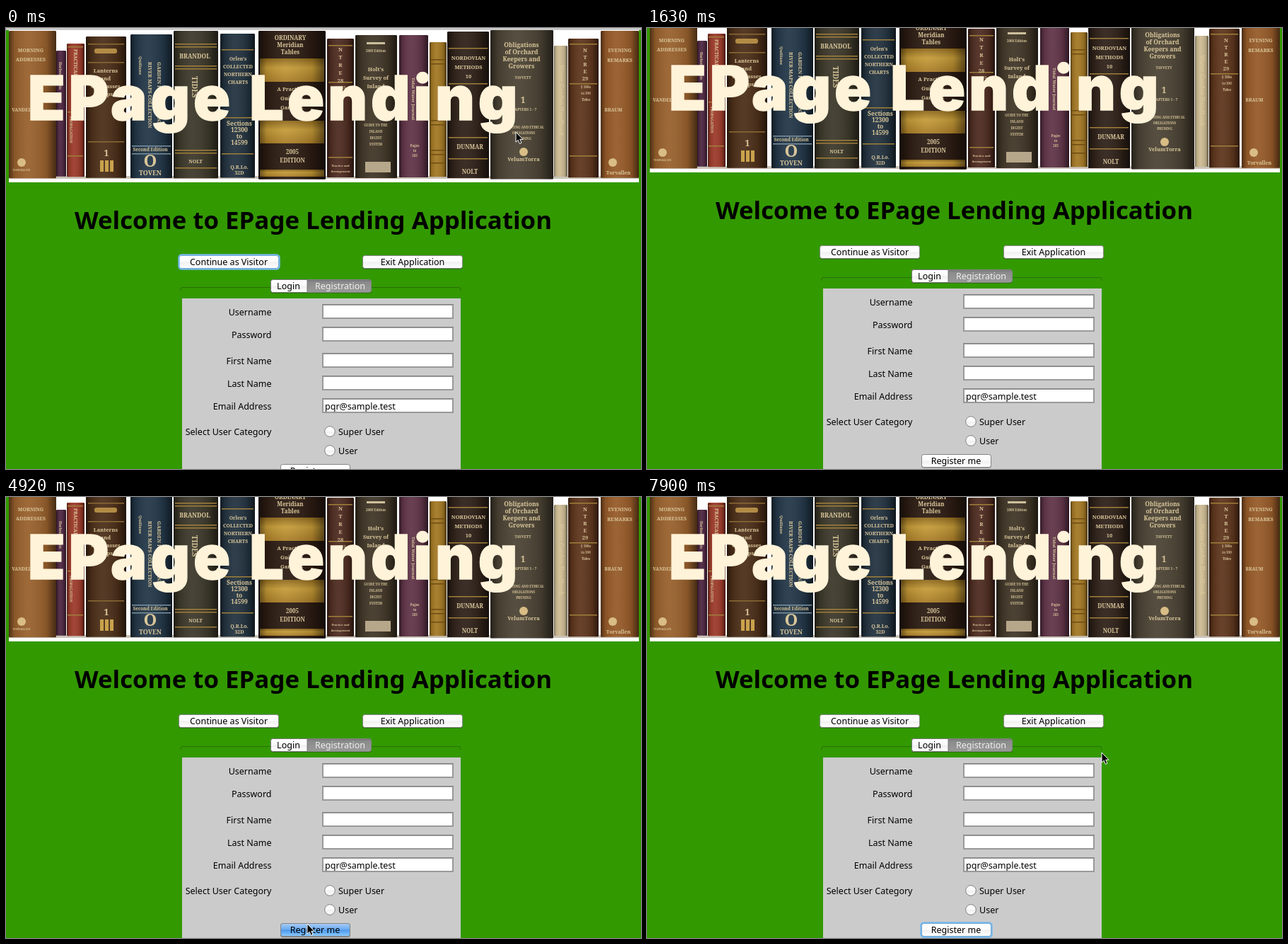
Recreate the animation shown at these times as an HTML page. Size 898 by 623 pixels, loop 8000 ms.

```html
<!DOCTYPE html>
<html lang="en">
<head>
<meta charset="utf-8">
<title>EPage Lending</title>
<style>
  html, body { margin: 0; width: 100%; height: 100%; overflow: hidden; background: #390; }
  svg { display: block; width: 898px; height: 623px; }
  text { font-family: "Noto Sans", "Open Sans", sans-serif; font-size: 12.5px; white-space: pre; }
  .spine { font-family: "Noto Serif", serif; font-weight: 600; fill: #d9c69a; }
  .banner { font: 900 86px Inter, "Liberation Sans", sans-serif; letter-spacing: 5px; fill: #fff3d9; stroke: #fff3d9; stroke-width: 1.4; }
  .heading { font-size: 34.8px; font-weight: 700; }
  .caption { font: 13px "Liberation Sans", sans-serif; fill: #444; }
  .ring { fill: none; stroke: #74b8ee; stroke-width: 2.4; }
  .window { position: absolute; left: 403px; top: 229px; width: 309px; height: 156px; border-radius: 5px;
    box-shadow: 0 19px 40px rgba(0,0,0,.62), 0 0 1px rgba(0,0,0,.6); }
</style>
</head>
<body>
<svg id="stage" viewBox="0 0 898 623"></svg>
<script>
const LOOP = 8000;

// x, width, top, colour
const books = [
  [4, 67, 4, "#98602c"], [71, 14, 32, "#4c2540"], [86, 25, 22, "#9c3a2a"],
  [113, 57, 12, "#4b2e18"], [176, 59, 9, "#233748"], [237, 63, 4, "#3c382a"],
  [303, 49, 8, "#22323f"], [357, 95, 4, "#2b1b12"], [454, 38, 15, "#4d2b20"],
  [494, 59, 10, "#403627"], [556, 41, 10, "#603448"], [599, 24, 20, "#a37824"],
  [624, 59, 5, "#2e2119"], [685, 89, 3, "#4b4334"], [775, 19, 25, "#cdbb92"],
  [795, 43, 15, "#5e351c"], [841, 54, 4, "#965a28"]
];

// x centre, first baseline, size, leading, lines
const titles = [
  [35, 34, 7, 13, "MORNING|ADDRESSES"], [22, 118, 6.5, 9, "VANDEL"], [22, 202, 4, 9, "TORVALLEN"],
  [141, 63, 7.5, 11, "Lanterns|and|Compasses|Maps"], [142, 181, 13, 9, "1"],
  [204, 174, 6.5, 9, "Second Edition"], [204, 196, 24, 9, "O"], [204, 208, 9, 9, "TOVEN"],
  [267, 43, 8.5, 9, "BRANDOL"], [268, 191, 7, 9, "NOLT"],
  [328, 46, 6.8, 11, "Orlen's|COLLECTED|NORTHERN|CHARTS"], [330, 138, 8.5, 9, "Sections|12300|to|14599"],
  [330, 199, 7, 8, "Q.R.Lo.|32D"], [402, 17, 8, 10, "ORDINARY|Meridian|Tables"],
  [404, 89, 7.5, 13, "A Practical|Guide to|Gardens"], [405, 178, 8, 12, "2005|EDITION"],
  [473, 33, 7.5, 11, "N|T|R|E|28"], [473, 86, 5, 8, "§ 1351|to 1400"], [473, 196, 4, 8, "Practice and|Arrangement"],
  [523, 34, 4.5, 9, "2008 Edition"], [523, 61, 7.5, 12, "Holt's|Survey of|Inland"],
  [523, 139, 4.5, 9, "GUIDE TO THE|INLAND|DIGEST|SYSTEM"], [578, 168, 4.5, 7, "Pages|to|263"],
  [654, 45, 7.5, 13, "NORDOVIAN|METHODS|10"], [656, 171, 8, 9, "DUNMAR"], [656, 206, 8, 9, "NOLT"],
  [729, 27, 8.5, 10, "Obligations|of Orchard|Keepers and|Growers"], [731, 72, 5, 9, "TAVVETT"],
  [731, 106, 12, 9, "1"], [731, 117, 5, 9, "CHAPTERS 1 - 7"],
  [732, 142, 4.5, 8, "PLANTING AND ETHICAL|OBLIGATIONS|PRUNING"], [732, 188, 7.5, 9, "VelumTorra"],
  [819, 34, 7.5, 10, "N|T|R|E|29"], [820, 85, 4.5, 9, "§ 186a|to 190|Tides"],
  [868, 34, 7, 14, "EVENING|REMARKS"], [859, 118, 6.5, 9, "BRAUM"], [866, 207, 7, 9, "Torvallen"]
];

// x, y, size, text running down the spine
const upright = [
  [75, 48, 5, "Harbour Lights"], [96, 30, 6.5, "PRACTICAL GARDENING"], [90, 125, 5, "PROPAGATION"],
  [214, 48, 7, "GARDEN PLANNING AND"], [201, 48, 7, "RIVER MAPS COLLECTION"], [188, 40, 6, "Quillane"],
  [263, 68, 10, "TIDES"], [574, 70, 6, "Tidal Water Journal"], [782, 52, 8, "Water Garden Handbook"]
];

const rect = (x, y, w, h, fill, more = "") =>
  `<rect x="${x}" y="${y}" width="${w}" height="${h}" fill="${fill}" ${more}/>`;
const text = (x, y, s, more = "") => `<text x="${x}" y="${y}" ${more}>${s}</text>`;
const mid = 'text-anchor="middle"';
const group = (id, inner) => `<g id="${id}">${inner}</g>`;
const ring = (id, x, y, w, h, r = 4) =>
  `<rect id="${id}" class="ring" x="${x}" y="${y}" width="${w}" height="${h}" rx="${r}"/>`;
const fade = (id, stops, dir = 'x2="0" y2="1"') => `<linearGradient id="${id}" ${dir}>` +
  stops.map(([o, c, a = 1]) => `<stop offset="${o}" stop-color="${c}" stop-opacity="${a}"/>`).join("") +
  "</linearGradient>";

function face(x, y, w, h, fill = "url(#white)") {
  return rect(x, y + 1, w, h, "#000", 'rx="3.5" opacity=".22"') +
    rect(x + .5, y + .5, w - 1, h - 1, fill, 'rx="3" stroke="#858585"');
}

function button(x, y, w, h, label) {
  return face(x, y, w, h) + text(x + w / 2, y + h / 2 + 4.5, label, mid);
}

function field(y, value = "") {
  return rect(448, y - 10, 184, 19, "#fff", 'stroke="#999" stroke-width="2"') +
    rect(447, y - 11, 186, 1, "#858585") + text(451, y + 4.5, value);
}

function radio(y, label) {
  return `<circle cx="458" cy="${y}" r="7.3" fill="url(#white)" stroke="#828282"/>` + text(470, y + 4.5, label);
}

function shelf() {
  const lines = (x, w, ys, c = "#a07f3a") => ys.map(y => rect(x, y, w, 1.5, c)).join("");
  const volumes = (fill, more) => books.map(([x, w, y, c]) =>
    rect(x, y, w, 209 - y + w / 20, fill || c, 'rx="1.5"')).join("");
  const gold = [[43, 33], [131, 32], [200, 10]].map(([y, h]) => rect(359, y, 91, h, "url(#gold)")).join("");
  const trim = lines(239, 59, [22, 26, 53, 57, 172, 176, 197]) + lines(305, 45, [30, 126, 177]) +
    lines(626, 55, [28, 78, 154, 184]) + lines(456, 34, [24, 76, 182]) + lines(797, 39, [22, 78, 180]) +
    lines(87, 22, [26, 118, 180]) + lines(600, 22, [44, 50, 130, 136, 172, 178, 190], "#6e4d12") +
    lines(178, 55, [166, 177], "#7991a0") + lines(116, 51, [22, 48, 160], "#8c6a35") +
    [133, 140, 147].map(x => rect(x, 187, 5, 16, "#c9a24c")).join("") +
    rect(508, 189, 36, 15, "#b7a78a") + rect(510, 20, 26, 3, "#cdbf9c") + rect(125, 29, 32, 7, "#b28b45", 'rx="3"');
  const dots = [[22, 190], [732, 175], [858, 190]].map(([x, y]) =>
    `<circle cx="${x}" cy="${y}" r="6" fill="#d9bd85"/>`).join("");
  const across = titles.map(([x, y, size, lead, s]) => s.split("|").map((line, i) =>
    text(x, y + i * lead, line, `class="spine" ${mid} style="font-size:${size}px"`)).join("")).join("");
  const down = upright.map(([x, y, size, s]) =>
    text(0, 0, s, `class="spine" transform="translate(${x} ${y}) rotate(90)" style="font-size:${size}px"`)).join("");
  return rect(4, 3, 891, 215, "#fff") + rect(4, 209, 891, 4, "#c9c3b8") +
    volumes() + gold + volumes("url(#round)") + trim + dots + across + down;
}

function form() {
  const labels = [[401, "Username"], [433, "Password"], [470, "First Name"], [502, "Last Name"],
    [534, "Email Address"], [570, "Select User Category"]];
  return rect(249, 382, 394, 260, "#cbcbcb") +
    labels.map(([y, s]) => text(375.5, y + 4.5, s, 'text-anchor="end"')).join("") +
    [401, 433, 470, 502].map(y => field(y)).join("") + field(534, "pqr@sample.test") +
    radio(570, "Super User") + radio(597, "User") +
    ring("fieldRing", 447, 390, 186, 21, 1) + group("caret", rect(451, 393, 1, 15, "#000")) +
    button(388, 616, 99, 19, "") + group("pressed", face(388, 616, 99, 19, "url(#blue)")) +
    text(437, 629.5, "Register me", mid) + ring("registerRing", 387.5, 615.5, 100, 20);
}

function page() {
  return rect(0, 0, 898, 660, "#390") + `<rect id="edge" width="898" height="3"/>` + shelf() +
    text(31, 130, "EPage Lending", 'class="banner"') +
    text(434.5, 283.5, "Welcome to EPage Lending Application", `class="heading" ${mid}`) +
    button(244, 321, 142, 19, "Continue as Visitor") + ring("visitorRing", 244.5, 320.5, 142, 20) +
    button(504, 321, 142, 19, "Exit Application") +
    '<path d="M247 371V369Q247 366.5 250 366.5H640Q643 366.5 643 369V371" fill="none" stroke="#276f0a"/>' +
    face(374, 355, 143, 19, "url(#grey)") +
    '<path d="M426 355.5H377.5Q374.5 355.5 374.5 358.5V370.5Q374.5 373.5 377.5 373.5H426Z" fill="url(#white)" stroke="#777"/>' +
    text(399.5, 369, "Login", mid) + text(472.5, 369, "Registration", `${mid} fill="#f0f0f0"`) + form();
}

function dialog() {
  return '<foreignObject width="898" height="623"><div class="window"></div></foreignObject>' +
    rect(403, 229, 309, 156, "#ececec", 'rx="5"') +
    '<path d="M403 249.5V234Q403 229 408 229H707Q712 229 712 234V249.5Z" fill="url(#bar)"/>' +
    rect(403, 249, 309, 1, "#b9b9b9") +
    '<circle cx="416" cy="239.5" r="5.5" fill="#fc5b56" stroke="#df4744" stroke-width=".8"/>' +
    [434.5, 453.5].map(x => `<circle cx="${x}" cy="239.5" r="5.5" fill="#d3d3d3" stroke="#b8b8b8"/>`).join("") +
    text(557, 244, "Message", `class="caption" ${mid}`) +
    group("content",
      rect(432.5, 270.5, 48, 50, "url(#tile)", 'stroke="#7894ad"') +
      '<circle cx="457" cy="296" r="14" fill="#5382a1"/>' +
      text(513, 298.5, "All field needs to be filled out.") +
      face(624, 345, 63, 20, "url(#pale)") + group("okDown", face(624, 345, 63, 20, "url(#blue)")) +
      ring("okRing", 623.5, 344.5, 64, 21) + text(655, 359.5, "OK", mid));
}

const stage = document.getElementById("stage");
stage.innerHTML = "<defs>" +
  fade("white", [[0, "#fff"], [.48, "#fbfbfb"], [.52, "#f0f0f0"], [1, "#fff"]]) +
  fade("grey", [[0, "#737373"], [.2, "#8b8b8b"], [1, "#999"]]) +
  fade("blue", [[0, "#a9cdf6"], [.48, "#69aaf0"], [.52, "#4d98ec"], [1, "#8accff"]]) +
  fade("pale", [[0, "#d6e9fd"], [.48, "#a5d0fa"], [.52, "#86bff8"], [1, "#bfe6ff"]]) +
  fade("bar", [[0, "#eaeaea"], [1, "#d2d2d2"]]) +
  fade("tile", [[0, "#fff"], [.5, "#f5f8fa"], [1, "#d3dee8"]]) +
  fade("gold", [[0, "#8d681d"], [.4, "#c59b38"], [1, "#a87c27"]]) +
  fade("round", [[0, "#000", .5], [.12, "#000", .1], [.4, "#fff", .06], [.8, "#000", .12], [1, "#000", .55]], 'x2="1" y2="0"') +
  "</defs>" + group("page", page()) + group("dialog", dialog()) +
  group("cursor", '<path d="M0 0V14.2L3.2 11.2 5.4 16.4 7.9 15.3 5.7 10.3H10Z" fill="#000" stroke="#fff" stroke-width="1"/>');

const easeInOut = p => p * p * (3 - 2 * p);
const easeOut = p => p * (2 - p);

// The pointer is redrawn about every 148 ms while it travels; `first` is the progress of the first redraw.
function glide(start, count, from, to, ease = easeInOut, first = 1 / count) {
  return Array.from({ length: count }, (_, i) => {
    const p = ease(first + (1 - first) * i / (count - 1));
    return [Math.round((start + i * 147.5) / 10) * 10, { at: from.map((v, k) => v + (to[k] - v) * p) }];
  });
}

// Each step changes only the listed properties.
const steps = [
  [0, { at: [721, 147], visitorRing: 1, active: 1, scroll: 0 }],
  ...glide(140, 4, [721, 147], [727, -18]),
  [1030, { at: null, visitorRing: 0, active: 0 }],
  [1480, { scroll: -7 }], [1630, { scroll: -14 }],
  ...glide(2230, 5, [627, 149], [527, 384], easeOut, 0),
  [3570, { fieldRing: 1, caret: 1 }],
  ...glide(3720, 6, [527, 384], [426, 603]),
  [4170, { caret: 0 }], [4620, { caret: 1 }],
  [4920, { fieldRing: 0, caret: 0, pressed: 1 }],
  [6120, { dialog: 1 }], [6270, { content: 1, okRing: 1 }], [6420, { pressed: 0 }],
  ...glide(6420, 6, [426, 603], [651, 361]),
  [7610, { okDown: 1 }], [7750, { dialog: 0 }],
  [7900, { at: [643, 361], registerRing: 1 }]
];

const $ = id => document.getElementById(id);
const toggles = ["visitorRing", "fieldRing", "caret", "pressed", "registerRing", "dialog", "content", "okRing", "okDown"];
const show = (id, on) => $(id).setAttribute("display", on ? "inline" : "none");
const move = (id, x, y) => $(id).setAttribute("transform", `translate(${x} ${y})`);

function draw(t) {
  const state = Object.assign({}, ...steps.filter(([start]) => start <= t).map(([, change]) => change));
  toggles.forEach(id => show(id, state[id]));
  show("cursor", state.at);
  if (state.at) move("cursor", ...state.at.map(Math.round));
  move("page", 0, state.scroll);
  $("edge").setAttribute("fill", state.active ? "#c9c9c9" : "#dedede");
}

const begin = performance.now();
function tick() {
  draw((performance.now() - begin) % LOOP);
  requestAnimationFrame(tick);
}
tick();
</script>
</body>
</html>
```
